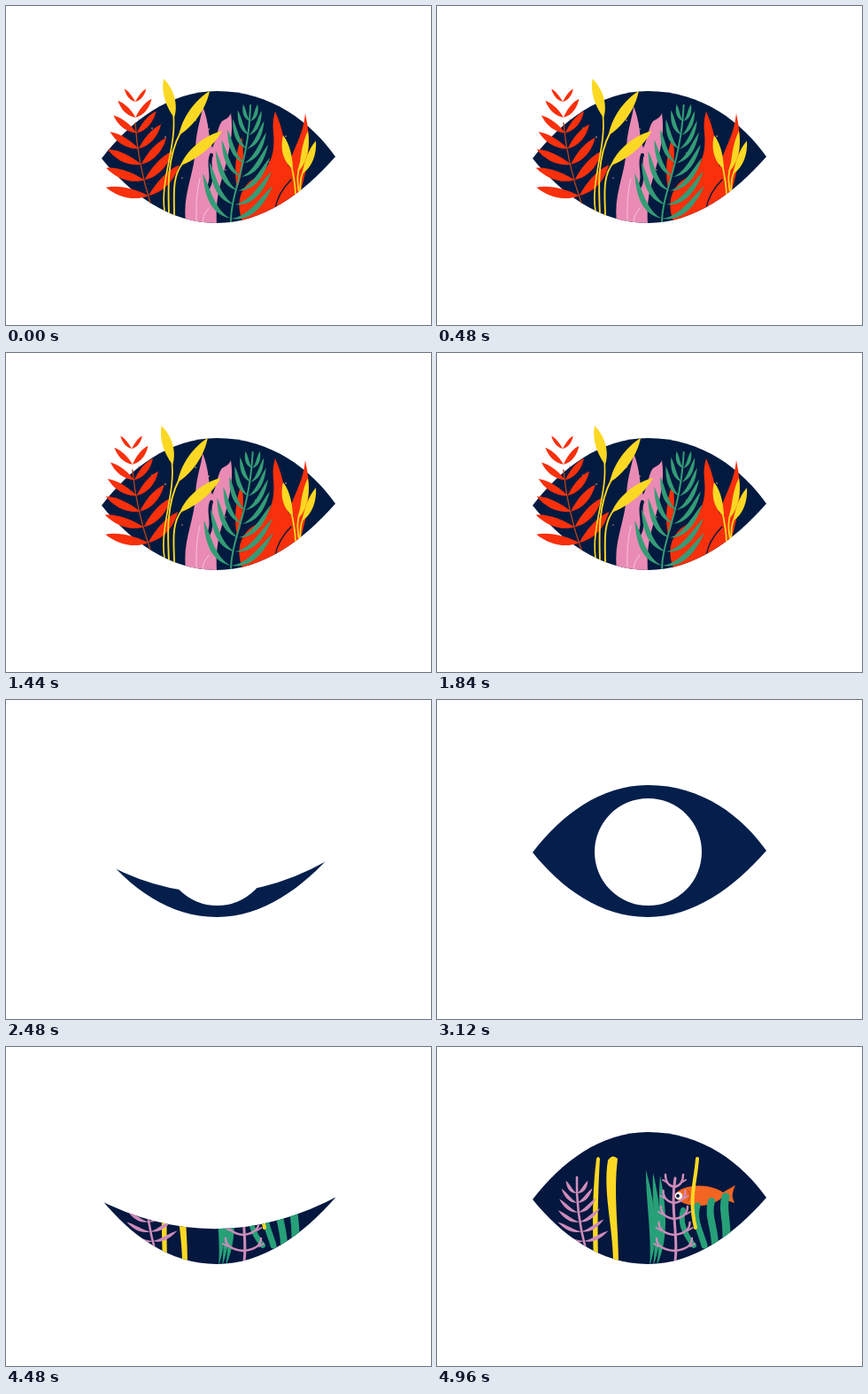
An HTML page with a canvas that plays this animation: 480 by 360 pixels, repeating every 5000 ms.

```html
<!DOCTYPE html>
<html lang="en">
<head>
<meta charset="utf-8">
<title>Blinking eye</title>
<style>
  html, body { margin: 0; width: 100%; height: 100%; overflow: hidden; background: #fff; }
  canvas { display: block; width: 480px; height: 360px; }
</style>
</head>
<body>
<canvas id="stage" width="480" height="360"></canvas>
<script>
const ctx = document.getElementById('stage').getContext('2d');
const LOOP = 5000, STEP = 40;
const RED = '#f8300c', YELLOW = '#fbd823', GREEN = '#349c76', NAVY = '#021a3f', PINK = '#e98bb4';

const LOWER_LID = 'C335 212 290 245 238 245C185 245 140 212 108 172';
const eye = new Path2D('M108 172C140 130 185 96 238 96C300 96 345 132 372 170' + LOWER_LID + 'Z');
const aboveLowerLid = new Path2D('M0 0H480V170H372' + LOWER_LID + 'H0Z');
const eyeWithHole = new Path2D(eye);
eyeWithHole.moveTo(299, 171.5);
eyeWithHole.arc(238.5, 171.5, 60.5, 0, Math.PI * 2);

const mix = (a, b, k) => a + (b - a) * k;
const ease = u => u * u * (3 - 2 * u);
const progress = (t, from, to) => ease(Math.min(1, Math.max(0, (t - from) / (to - from))));

function fill(path, color) {
  ctx.fillStyle = color;
  ctx.fill(path instanceof Path2D ? path : new Path2D(path), 'evenodd');
}

function line(path, color, width) {
  ctx.strokeStyle = color;
  ctx.lineWidth = width;
  ctx.lineCap = 'round';
  ctx.lineJoin = 'round';
  ctx.stroke(new Path2D(path));
}

function dot(x, y, r, color) {
  ctx.beginPath();
  ctx.arc(x, y, r, 0, Math.PI * 2);
  ctx.fillStyle = color;
  ctx.fill();
}

// Pointed leaf from base to tip; bend pushes the part near the base sideways.
function leaf(x1, y1, x2, y2, thickness, color, bend = 0) {
  const dx = x2 - x1, dy = y2 - y1, length = Math.hypot(dx, dy);
  const at = (u, d) => `${x1 + dx * u - dy / length * d} ${y1 + dy * u + dx / length * d}`;
  const w = thickness * 0.67, near = bend * 1.5, far = bend * 0.5;
  fill(`M${x1} ${y1}C${at(0.3, near + w)} ${at(0.7, far + w)} ${x2} ${y2}` +
       `C${at(0.7, far - w)} ${at(0.3, near - w)} ${x1} ${y1}Z`, color);
}

// Mirrored leaf pairs along a stem, from its top (s = 0) to its foot (s = 1).
function frond(pairs, color, stem, { axis, spread, length, thickness, bend }) {
  for (let i = 0; i < pairs; i++) {
    const s = i / (pairs - 1), [x, y] = stem(s);
    for (const side of [-1, 1]) {
      const angle = (axis * s + side * spread(s)) * Math.PI / 180;
      leaf(x, y, x + length(s) * Math.sin(angle), y - length(s) * Math.cos(angle),
           thickness(s), color, side * bend(s));
    }
  }
}

function scoped(draw, clip) {
  ctx.save();
  if (clip) ctx.clip(clip);
  draw();
  ctx.restore();
}

// Leans everything drawn sideways around a fixed ground line.
function swaying(amount, groundY, draw) {
  scoped(() => {
    ctx.transform(1, 0, -amount, 1, amount * groundY, 0);
    draw();
  });
}

function stars() {
  for (let i = 0; i < 14; i++) {
    dot(150 + (i * 83) % 200, 128 + (i * 47) % 75, 0.8, i % 3 ? '#e9c9a0' : '#d98290');
  }
}

function redFern() {
  line('M163 222C154 194 148 166 146 132', '#b5421b', 1.4);
  frond(7, RED, s => [146 + 15 * s * s, 108 + 106 * s], {
    axis: -17,
    spread: s => 40 + 22 * s,
    length: s => 19 + 30 * s ** 0.7,
    thickness: s => 4 + 6.5 * s ** 0.6,
    bend: s => 1 + s
  });
}

function yellowPlant() {
  line('M189 122C193 158 174 196 179 231', YELLOW, 1.7);
  line('M197 143C182 170 183 204 184 234', YELLOW, 1.9);
  line('M200 177C187 192 190 215 190 236', YELLOW, 1.9);
  leaf(190, 126, 178, 82, 11, YELLOW, 1);
  leaf(195, 146, 230, 96, 12, YELLOW);
  leaf(197, 180, 244, 141, 12, YELLOW, -1);
}

function pinkFlames() {
  fill('M203 244C199 212 213 190 214 160C215 138 221 126 222 113C230 132 228 148 233 160' +
       'C238 150 239 136 244 130C249 127 252 126 254 121C257 142 253 158 249 176' +
       'C245 194 236 212 238 246Z', PINK);
  line('M232 168C227 180 236 192 228 206', NAVY, 4);
  line('M219 195C214 214 215 232 215 246M222 245C222 236 226 233 229 228', '#f7d3df', 0.8);
}

function redFlames() {
  fill('M268 245C258 222 266 205 277 197C300 184 304 165 302 143C301 132 302 126 304 119' +
       'C314 141 316 162 319 182C324 160 335 149 338 121C345 151 342 180 332 211' +
       'C314 232 290 244 268 245Z', RED);
  line('M304 229C306 216 313 205 322 196', NAVY, 1.4);
  leaf(261, 206, 266, 148, 8, RED);
}

function smallYellowPlant() {
  line('M322 178C325 192 327 202 327 214M333 176C327 192 330 202 331 212M338 183C331 193 333 202 332 211', YELLOW, 1.8);
  leaf(324, 184, 313, 146, 9, YELLOW, -2);
  leaf(331, 186, 341, 141, 7, YELLOW, 2);
  leaf(334, 190, 350, 152, 8, YELLOW, 2);
}

function greenFern() {
  line('M254 245C253 212 274 180 276 112', GREEN, 2);
  frond(8, GREEN, s => [276 - 22 * s ** 1.4, 130 + 110 * s], {
    axis: 10,
    spread: s => 23 + 19 * s,
    length: s => 21 + 39 * s ** 0.7,
    thickness: s => 4 + 2 * s,
    bend: s => 3 + 7 * s
  });
}

function jungle(t) {
  const fernLean = Math.floor(t / 160) % 2;
  const plantLean = Math.floor(t / 280) % 2;
  fill(eye, NAVY);
  stars();
  swaying(fernLean * -0.035, 222, redFern);
  scoped(() => {
    pinkFlames();
    swaying(plantLean * -0.016, 235, yellowPlant);
    redFlames();
    smallYellowPlant();
    swaying(fernLean * 0.02, 244, greenFern);
  }, aboveLowerLid);
}

function blankEye() {
  fill(eyeWithHole, '#041f4c');
}

function pinkSeaFern(color) {
  line('M168 228C160 198 157 174 158 147', color, 2.6);
  frond(6, color, s => [158 + 8 * s * s, 165 + 54 * s], {
    axis: -4,
    spread: s => 41 + 30 * s,
    length: s => 19 + 11 * Math.sqrt(s),
    thickness: () => 4,
    bend: () => 3
  });
}

function fish() {
  fill('M267 168C278 153 308 154 323 164L337 156Q331 167 336 176L321 171C307 182 280 183 267 168Z', '#f26522');
  dot(273, 168, 4.2, '#fff');
  dot(272, 168, 2, NAVY);
  line('M283 161Q288 168 283 175', '#c84618', 1);
}

function coral(color) {
  line('M269 242C273 210 263 184 269 148', color, 3);
  for (let i = 0; i < 5; i++) {
    const y = 158 + 18 * i, reach = 10 + 2.5 * i;
    for (const side of [-1, 1]) {
      const x = 268 + side * reach;
      line(`M268 ${y}Q${x} ${y - 2} ${x} ${y - 14}`, color, 2.4);
      line(`M${x - side * 2} ${y - 5}l${side * 5} -3`, color, 2);
    }
  }
}

function sea(t) {
  const pink = '#ce8cba', green = '#27a078';
  const lean = 0.02 * Math.sin((t - 4960) / 160);
  fill(eye, '#03173f');
  scoped(() => {
    swaying(lean, 240, () => {
      fill('M180 126Q182 122 184 126C182 160 181 195 182 240H177C175 195 176 158 180 126Z', YELLOW);
      fill('M193 128Q198 120 204 126C199 165 205 203 205 243H199C199 204 187 163 193 128Z', YELLOW);
      pinkSeaFern(pink);
      for (let i = 0; i < 3; i++) leaf(240 + 4 * i, 247, 236 + 8 * i, 139 + 3 * i, 7, green, 6);
    });
    scoped(() => {
      ctx.translate((4960 - t) * 0.02, 0);
      fish();
    });
    for (let i = 0; i < 4; i++) {
      const x = 278 + 16 * i, y = 184 - 5 * i;
      line(`M${x} ${y}C${x - 5} ${y + 16} ${x + 4} ${y + 30} ${x + 12 - 4 * i} 224`, green, 6 + i);
    }
    swaying(lean, 230, () => {
      line('M294 126C292 153 284 171 292 204', YELLOW, 4);
      coral(pink);
    });
  }, eye);
}

// 0 is open, 1 is shut.
function closure(t) {
  if (t < 2330) return progress(t, 1940, 2290);
  if (t < 3600) return 1 - progress(t, 2370, 2770);
  if (t < 4320) return progress(t, 3920, 4240);
  return 1 - progress(t, 4350, 4750);
}

function visibleBelowLid(k) {
  const left = mix(80, 200, k), right = mix(100, 187, k), middle = mix(60, 253, k);
  const control = 2 * middle - (left + right) / 2;
  return new Path2D(`M0 ${left}H100Q240 ${control} 380 ${right}H480V360H0Z`);
}

function render(now) {
  const t = Math.floor((now % LOOP) / STEP) * STEP;
  const k = closure(t);
  const scene = t < 2330 ? jungle : t < 4300 ? blankEye : sea;
  ctx.fillStyle = '#fff';
  ctx.fillRect(0, 0, 480, 360);
  if (k < 1) scoped(() => scene(t), k > 0 ? visibleBelowLid(k) : null);
}

const start = performance.now();
function tick() {
  render(performance.now() - start);
  requestAnimationFrame(tick);
}
tick();
</script>
</body>
</html>
```
